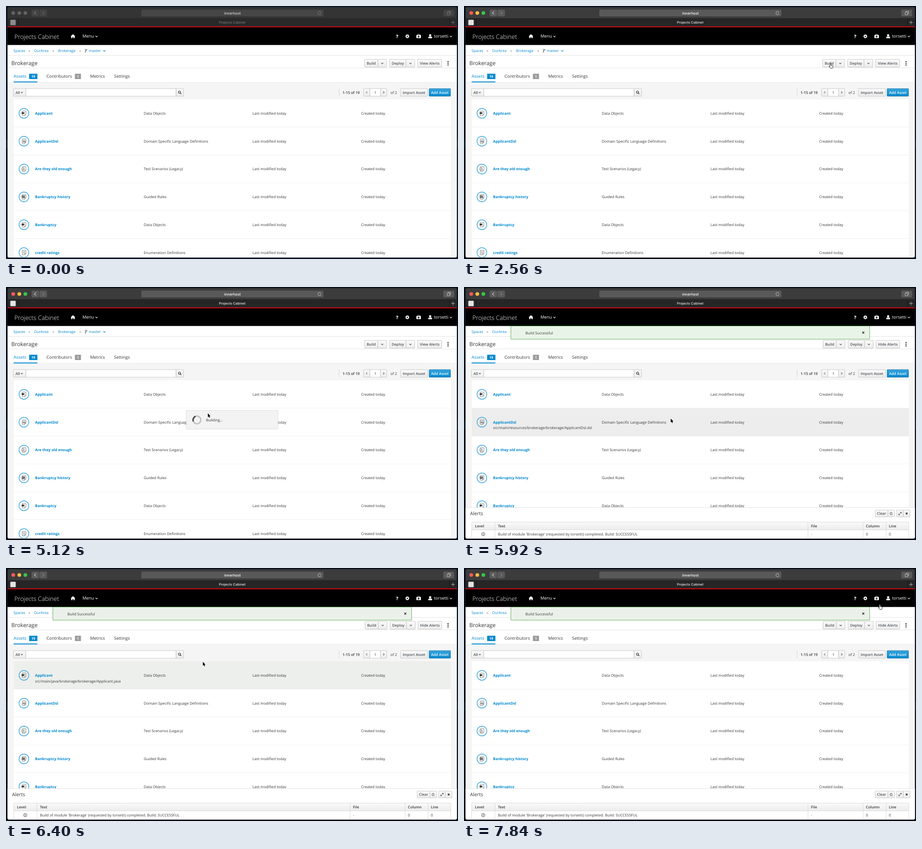
Recreate the animation shown at these times as an HTML page with a canvas. Size 999x561 px, loop 8 s.

```html
<!DOCTYPE html>
<html lang="en">
<head>
<meta charset="utf-8">
<title>Asset build</title>
<style>
html, body { margin: 0; width: 100%; height: 100%; overflow: hidden; background: #0c1626; }
canvas { display: block; width: 999px; height: 561px; }
</style>
</head>
<body>
<canvas id="stage"></canvas>
<script>
const W = 999, H = 561, LOOP = 8000, STEP = 160;
const canvas = document.getElementById('stage');
const dpr = window.devicePixelRatio || 1;
canvas.width = W * dpr;
canvas.height = H * dpr;
const c = canvas.getContext('2d');
c.scale(dpr, dpr);
c.textRendering = 'geometricPrecision';

const BLUE = '#0088ce', INK = '#363636', SMALL = 8.12, MID = 9.48;
const APP = 'Projects Cabinet', USER = 'torsetti', PROJECT = 'Brokerage';
const ROWS = [
  ['Applicant', 'Data Objects', 0],
  ['ApplicantDsl', 'Domain Specific Language Definitions', 1],
  ['Are they old enough', 'Test Scenarios (Legacy)', 2],
  ['Bankruptcy history', 'Guided Rules', 3],
  ['Bankruptcy', 'Data Objects', 0],
  ['credit ratings', 'Enumeration Definitions', 4]
];
const PATHS = ['src/main/java/brokerage/brokerage/Applicant.java',
  'src/main/resources/brokerage/brokerage/ApplicantDsl.dsl'];

// Pointer keys: time, x, y
const POINTER = [
  [320, 773, 422], [640, 826, 305], [800, 852, 230], [960, 845, 172], [1120, 824, 135],
  [1280, 817, 124], [1920, 817, 124], [2560, 810, 127], [3039, 810, 127], [3040, 808, 127],
  [4320, 808, 127], [4480, 775, 140], [4640, 680, 180], [4800, 560, 232], [4960, 475, 268],
  [5120, 446, 280], [6080, 459, 294], [6240, 459, 294], [6400, 435, 208], [6720, 325, 112],
  [7040, 215, 70], [7200, 202, 64], [7360, 202, 64], [7520, 420, 90], [7680, 710, 96],
  [7840, 919, 81]
];

function rect(x, y, w, h, fill) {
  c.fillStyle = fill;
  c.fillRect(x, y, w, h);
}

function box(x, y, w, h, fill, stroke, r = 0) {
  c.beginPath();
  c.roundRect(x, y, w, h, r);
  if (fill) { c.fillStyle = fill; c.fill(); }
  if (stroke) { c.strokeStyle = stroke; c.lineWidth = 0.8; c.stroke(); }
}

function text(s, x, y, size = SMALL, color = INK, weight = 400, align = 'left', face = 'Open Sans') {
  c.font = `${weight} ${size}px "${face}", sans-serif`;
  c.fillStyle = color;
  c.textAlign = align;
  c.fillText(s, x, y);
}

function trace(points, color, width = 1, closed = false) {
  c.beginPath();
  points.forEach(([x, y]) => c.lineTo(x, y));
  if (closed) c.closePath();
  c.strokeStyle = color;
  c.lineWidth = width;
  c.stroke();
}

function disc(x, y, r, fill) {
  c.beginPath();
  c.arc(x, y, r, 0, 7);
  c.fillStyle = fill;
  c.fill();
}

function ring(x, y, r, color, width, from = 0, to = Math.PI * 2) {
  c.beginPath();
  c.arc(x, y, r, from, to);
  c.strokeStyle = color;
  c.lineWidth = width;
  c.stroke();
}

function chevron(x, y, color, dir = 'down', s = 2.3) {
  const h = s * 0.55;
  if (dir === 'down') trace([[x - s, y - h], [x, y + h], [x + s, y - h]], color, 1.1);
  else {
    const k = dir === 'left' ? -1 : 1;
    trace([[x - h * k, y - s], [x + h * k, y], [x - h * k, y + s]], color, 1.1);
  }
}

function shade(y, h, top, bottom) {
  const g = c.createLinearGradient(0, y, 0, y + h);
  g.addColorStop(0, top);
  g.addColorStop(1, bottom);
  return g;
}

function button(x, y, w, h, label, primary) {
  box(x, y, w, h, primary ? shade(y, h, '#39a5dc', BLUE) : shade(y, h, '#fafafa', '#ededed'),
    primary ? '#00659c' : '#bbb', 0.7);
  if (label) text(label, x + w / 2, y + h / 2 + 2.9, SMALL, primary ? '#fff' : '#4d5258', 600, 'center');
}

function cross(x, y, s, color, width) {
  trace([[x - s, y - s], [x + s, y + s]], color, width);
  trace([[x + s, y - s], [x - s, y + s]], color, width);
}

function reload(x, y, r, color) {
  ring(x, y, r, color, 0.9, 0.2, 5.2);
  trace([[x + r - 2, y - r + 0.2], [x + r - 0.8, y - r + 1.8], [x + r - 2.6, y - r + 2.6]], color, 0.8);
}

function chrome(active) {
  const ink = active ? '#d6d6d6' : '#858585';
  const control = active ? '#5a5a5b' : '#434344';
  rect(0, 0, W, H, active ? '#070d18' : '#0c1626');
  rect(0, 296, W, 20, active ? '#111b2c' : '#1a2538');
  box(3.5, 2.5, 993, 555.3, active ? '#3c3c3d' : '#343435', null, 3.5);
  rect(3.5, 27, 993, 19, active ? '#262627' : '#29292a');
  rect(27, 27, 1, 18, '#151515');
  rect(980, 27, 1, 18, '#151515');
  const lights = active ? ['#fc5b57', '#fdbc40', '#34c84a'] : ['#626263', '#626263', '#626263'];
  lights.forEach((col, i) => disc(16 + i * 13.4, 15.5, 4.1, col));
  box(56.5, 8, 16.5, 15, control, null, 2.5);
  box(74, 8, 16.5, 15, control, null, 2.5);
  chevron(64.5, 15.5, ink, 'left', 3.4);
  chevron(82.5, 15.5, active ? '#858585' : '#666', 'right', 3.4);
  box(299, 8, 402.5, 15, active ? '#59595a' : '#464647', null, 2.5);
  text('innerhost', 500.5, 18.8, 8.1, active ? '#fff' : '#d5d5d5', 500, 'center', 'Inter');
  reload(693, 15.7, 3.5, ink);
  box(966.5, 8, 24, 15, control, null, 2.5);
  box(977, 11.7, 5.6, 5.6, null, ink);
  box(975, 13.8, 5.6, 5.6, control, ink);
  box(9.5, 30.5, 12, 12, active ? '#e4e4e4' : '#8b8b8b', null, 1.5);
  text(APP, 500, 39.2, 7.45, active ? '#e8e8e8' : '#737373', 500, 'center', 'Inter');
  trace([[984, 36.5], [992, 36.5]], ink, 0.8);
  trace([[988, 32.5], [988, 40.5]], ink, 0.8);
}

function header() {
  rect(3.5, 47, 993, 39.5, '#000');
  rect(3.5, 45.2, 993, 2, '#d90b12');
  text(APP, 18.5, 72.7, 13.54, '#fff', 300);
  c.fillStyle = '#fff';
  c.beginPath();
  [[142.8, 67.2], [148, 62.5], [153.2, 67.2], [151.8, 67.2], [151.8, 71.3], [149, 71.3],
    [149, 68.5], [147, 68.5], [147, 71.3], [144.2, 71.3], [144.2, 67.2]].forEach(p => c.lineTo(...p));
  c.fill();
  text('Menu', 169, 70.3, MID, '#fff');
  chevron(200, 67.5, '#fff');
  text('?', 864.5, 70.6, 10, '#fff', 800, 'center');
  ring(887, 67.2, 2.5, '#fff', 2);
  for (let i = 0; i < 8; i++) {
    const a = i * Math.PI / 4, dx = Math.cos(a), dy = Math.sin(a);
    trace([[887 + dx * 3, 67.2 + dy * 3], [887 + dx * 4.3, 67.2 + dy * 4.3]], '#fff', 1.6);
  }
  box(909.7, 62.8, 4.6, 3, null, '#fff', 0.8);
  box(907, 64.3, 10, 7, '#fff', null, 1);
  rect(911.3, 65.5, 1.4, 4.6, '#000');
  rect(909.7, 67.1, 4.6, 1.4, '#000');
  disc(937.5, 65, 2.5, '#fff');
  box(933.3, 67.8, 8.4, 3.6, '#fff', null, [2, 2, 0.7, 0.7]);
  text(USER, 946, 70.3, MID, '#fff');
  chevron(983.3, 67.5, '#fff');
}

function titleBar(done) {
  rect(3.5, 86.5, 993, 83, '#fff');
  text('Spaces', 16.5, 102, SMALL, BLUE);
  text('OurArea', 62, 102, SMALL, BLUE);
  text(PROJECT, 115, 102, SMALL, BLUE);
  text('master', 183, 102, SMALL, BLUE);
  [49.5, 102.3, 162].forEach(x => text('»', x, 102, SMALL, '#777'));
  trace([[175.5, 97.5], [175.5, 101]], INK, 0.8);
  trace([[178.5, 97], [178.5, 98.6], [175.5, 100]], INK, 0.8);
  [[175.5, 96.4], [175.5, 102], [178.5, 96.4]].forEach(([x, y]) => ring(x, y, 0.8, INK, 0.7));
  chevron(217.3, 99.3, BLUE);
  rect(3.5, 109, 993, 0.8, '#ddd');
  rect(3.5, 136.8, 993, 0.8, '#ddd');
  text(PROJECT, 11.8, 131.4, 12.19);

  const d = done ? 1 : 0;
  button(792.5 + d, 118.3, 29.5, 17.2, 'Build');
  button(822 + d, 118.3, 19.3, 17.2);
  chevron(831.5 + d, 127.2, '#4d5258');
  button(847.8 + d, 118.3, 36.4, 17.2, 'Deploy');
  button(884.2 + d, 118.3, 19.3, 17.2);
  chevron(893.8 + d, 127.2, '#4d5258');
  button(909.6 + d, 118.3, 53.6 - d, 17.2, done ? 'Hide Alerts' : 'View Alerts');
  [123.3, 127, 130.7].forEach(y => disc(977, y, 1.25, '#222'));

  text('Assets', 16.8, 158.8, MID, BLUE);
  rect(51.2, 150.2, 18.2, 11.8, BLUE);
  text('19', 60.3, 159, 7.6, '#fff', 700, 'center');
  text('Contributors', 89.5, 158.8, MID);
  rect(152.3, 150.2, 13.4, 11.8, '#9c9c9c');
  text('1', 159, 159, 7.6, '#fff', 700, 'center');
  text('Metrics', 186, 158.8, MID);
  text('Settings', 238.7, 158.8, MID);
}

function filterBar() {
  box(3.5, 169, 993, 388.8, '#f5f5f5', null, [0, 0, 3.5, 3.5]);
  rect(3.5, 168.8, 993, 0.7, '#e4e4e4');
  rect(16.8, 167.4, 52.6, 2, BLUE);
  button(16.4, 183.2, 27.3, 16.8);
  text('All', 21, 194.5, SMALL, '#4d5258', 600);
  chevron(35, 191.8, '#4d5258', 'down', 2);
  box(43.8, 183.2, 332, 16.8, '#fff', '#bbb');
  button(376, 183.2, 16.3, 16.8);
  ring(383.4, 190.9, 2.4, INK, 1.2);
  trace([[385.2, 192.7], [387.4, 195]], INK, 1.5);
  rect(735.8, 183, 0.8, 17, '#ccc');
  text('1-15 of 19', 743.8, 194.5, SMALL, INK, 600);
  button(790.5, 183.2, 13.7, 16.8);
  chevron(797.2, 191.6, '#777', 'left');
  box(804.2, 183.2, 23.8, 16.8, '#fff', '#bbb');
  text('1', 816, 194.5, SMALL, INK, 400, 'center');
  button(828, 183.2, 13.4, 16.8);
  chevron(834.8, 191.6, '#4d5258', 'right');
  text('of 2', 849.8, 194.6);
  button(872, 183.2, 59.4, 16.8, 'Import Asset');
  button(935.2, 183.2, 47.2, 16.8, 'Add Asset', true);
}

function assetIcon(y, kind, fill) {
  disc(39.6, y, 10.8, fill);
  ring(39.6, y, 10.8, '#39a5dc', 1.4);
  trace([[36, y - 5], [44, y - 5], [44, y + 2.5], [41.5, y + 5], [36, y + 5]], '#666', 0.8, true);
  trace([[44, y + 2.5], [41.5, y + 2.5], [41.5, y + 5]], '#666', 0.7);
  if (kind === 0) {
    box(34.6, y - 2.6, 5, 4.2, '#333', null, 1);
    ring(40, y - 0.8, 1.2, '#333', 0.7);
  } else if (kind === 2) {
    disc(37.6, y, 2.9, fill);
    ring(37.6, y, 2.8, '#444', 0.8);
    trace([[36.4, y], [37.4, y + 1.1], [39.2, y - 1.2]], '#444', 0.8);
  } else if (kind === 3) {
    rect(34.8, y - 3, 7, 5.2, '#444');
    rect(35.8, y - 1.6, 1.2, 2.4, '#ddd');
    rect(38.3, y - 1.9, 2.4, 0.8, '#ddd');
    rect(38.3, y - 0.1, 2.4, 0.8, '#ddd');
  } else {
    if (kind === 1) rect(36, y - 0.6, 8, 2.4, '#999');
    [-2.6, -0.6, 1.4].forEach(d => rect(37.5, y + d, 5, 0.8, '#888'));
  }
}

function assetList(hover, t) {
  c.save();
  c.beginPath();
  c.rect(16.8, 206.8, 966.2, 350.5);
  c.clip();
  rect(16.8, 206.8, 966.2, 351, '#fff');
  ROWS.forEach(([name, type, kind], i) => {
    const y = 238 + i * 61.75, on = i === hover;
    const fill = on ? (t < 6400 ? '#ededed' : '#edefec') : '#fff';
    if (on) rect(16.8, y - 31, 966.2, 61.75, fill);
    rect(16.8, y + 30.3, 966.2, 0.8, '#ededed');
    assetIcon(y, kind, fill);
    text(name, 64.3, y + 2.9, SMALL, BLUE, 700);
    if (on) text(PATHS[i], 64.3, y + 15.6);
    text(type, 304.6, y + 2.9);
    text('Last modified today', 544.8, y + 2.9);
    text('Created today', 784.9, y + 2.9);
  });
  c.restore();
}

function alertsPanel() {
  box(3.5, 489, 993, 68.8, '#fff', null, [0, 0, 3.5, 3.5]);
  rect(3.5, 488.7, 993, 0.8, '#d8d8d8');
  text('Alerts', 13.2, 505.8, 10.83);
  button(908.8, 494.7, 28.2, 15, 'Clear');
  button(937, 494.7, 14.6, 15);
  reload(944.3, 502.3, 2.7, '#333');
  button(956.2, 494.7, 14.8, 15);
  trace([[961, 505], [966.4, 499.6]], '#333', 0.9);
  trace([[964, 499.4], [966.6, 499.4], [966.6, 502]], '#333', 0.9);
  trace([[960.8, 502.6], [960.8, 505.2], [963.4, 505.2]], '#333', 0.9);
  button(971, 494.7, 14.8, 15);
  cross(978.4, 502.3, 1.9, '#333', 1.5);

  rect(17, 521.3, 966, 17, shade(521, 17, '#fafafa', '#ededed'));
  trace([[17, 557.6], [17, 521.3], [983, 521.3], [983, 557.6]], '#d1d1d1', 0.8);
  rect(17, 538, 966, 0.8, '#d1d1d1');
  [68, 759.8, 881.7, 932.7].forEach(x => rect(x, 521.3, 0.8, 36.3, '#d1d1d1'));
  [['Level', 24.3], ['Text', 75], ['File', 766.8], ['Column', 888.3], ['Line', 939]]
    .forEach(([s, x]) => text(s, x, 532.7, SMALL, INK, 600));
  ring(42.5, 548, 3.6, '#333', 0.9);
  rect(42, 547.3, 1, 2.8, '#333');
  rect(42, 545.6, 1, 1, '#333');
  text(`Build of module '${PROJECT}' (requested by ${USER}) completed. Build: SUCCESSFUL`, 75, 551);
  text('-', 766.8, 551);
  text('0', 888.3, 551);
  text('0', 939, 551);
}

function notice(t) {
  box(103.6, 86.6, 793, 29, t < 6400 ? '#e9f4e9' : '#ebf1ea', '#3f9c35');
  text('Build Successful', 135.8, 104.5);
  cross(882.5, 101.2, 2.1, '#333', 1.4);
}

function progress(t) {
  box(398.6, 273.7, 202.2, 41.4, '#f3f3f3', '#d3d3d3', 0.7);
  const mid = Math.PI * (1.13 + (t - 5120) / 300);
  ring(422, 294.8, 8.6, '#c3c3c3', 3.2);
  ring(422, 294.8, 8.6, '#454545', 3.2, mid - Math.PI / 4, mid + Math.PI / 4);
  text('Building...', 442, 298.2);
}

function pointerAt(t) {
  const i = POINTER.findIndex(k => k[0] > t);
  if (i < 0) return POINTER[POINTER.length - 1].slice(1);
  const [t0, x0, y0] = POINTER[i - 1], [t1, x1, y1] = POINTER[i];
  const p = (t - t0) / (t1 - t0);
  return [x0 + (x1 - x0) * p, y0 + (y1 - y0) * p];
}

function pointer(t) {
  const [x, y] = pointerAt(t);
  const hand = (t >= 1920 && t < 3040) || (t >= 7200 && t < 7520) || t >= 7840;
  const shape = hand
    ? [[-1, 0.4], [0, -0.2], [1, 0.4], [1.1, 4], [4.6, 5], [5.6, 6], [5.2, 8.8], [4.2, 11],
      [0, 11], [-3.2, 7.2], [-2.8, 6], [-1, 7]]
    : [[0, 0], [0, 8.8], [2, 7], [3.4, 10.2], [4.9, 9.5], [3.5, 6.5], [6.2, 6.4]];
  c.save();
  c.lineJoin = 'round';
  if (t >= 1280 && t < 1600) {
    const later = t >= 1440;
    c.globalAlpha = later ? 0.4 : 1;
    ring(818.7, 127.8, later ? 13.8 : 11.2, '#333', 1);
    c.globalAlpha = 1;
  }
  c.translate(x, y);
  if (!hand) trace(shape, '#fff', 1.6, true);
  c.beginPath();
  shape.forEach(p => c.lineTo(...p));
  c.closePath();
  c.fillStyle = hand ? '#fff' : '#000';
  c.fill();
  if (hand) {
    trace(shape, '#111', 0.9, true);
    trace([[2.4, 5], [2.4, 6.6]], '#111', 0.6);
  }
  c.restore();
}

function draw(t) {
  const done = t >= 5440;
  const hover = !done ? -1 : t < 6400 ? 1 : t < 6560 ? 0 : -1;
  chrome(t >= 1920);
  header();
  titleBar(done);
  filterBar();
  assetList(hover, t);
  if (t >= 3040 && !done) progress(t);
  if (done) {
    alertsPanel();
    notice(t);
  }
  if (t >= 320) pointer(t);
}

const start = performance.now();
function tick() {
  const t = (performance.now() - start) % LOOP;
  draw(Math.floor(t / STEP) * STEP);
  requestAnimationFrame(tick);
}
tick();
</script>
</body>
</html>
```
